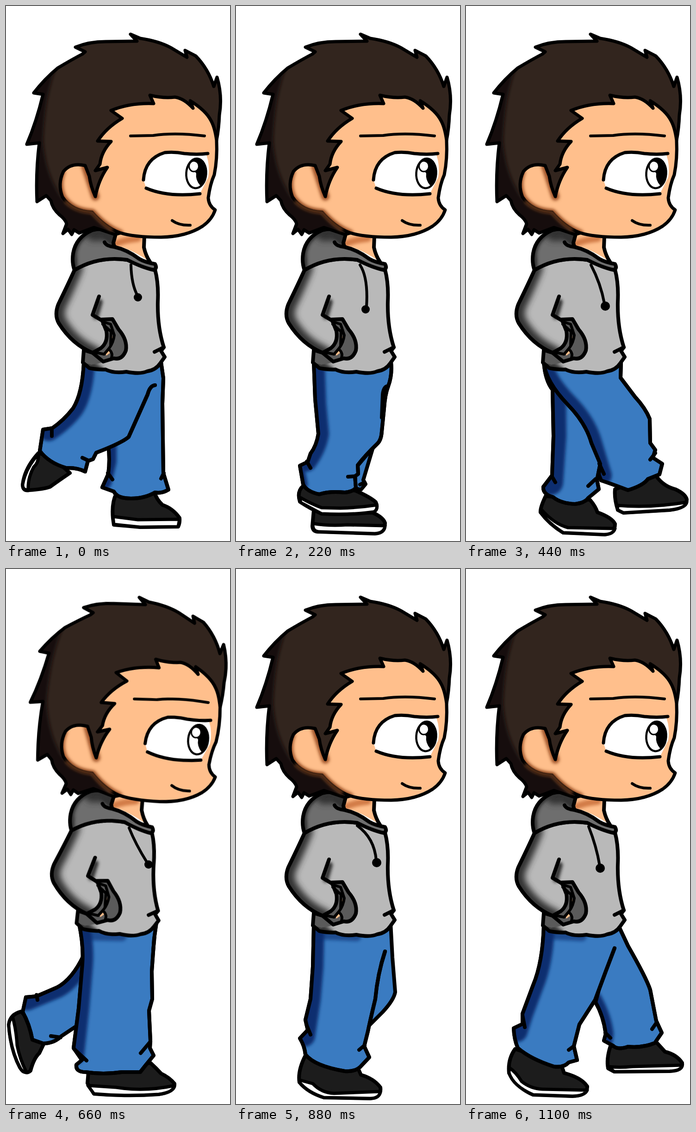
Write an HTML page without scripts that moves like this. It is 484x1157 px and loops after 1.32 s.

```html
<!DOCTYPE html>
<html lang="en">
<head>
<meta charset="utf-8">
<title>Walk cycle</title>
<style>
html, body { margin: 0; width: 100%; height: 100%; overflow: hidden; background: #fff; }
svg { display: block; width: 100%; height: 100%; }
path, use { stroke-linecap: round; stroke-linejoin: round; }
.line, .jean, .shoe, .sole, .cloth { stroke: #000; stroke-width: 8; }
.line { fill: none; }
.thin { stroke-width: 6; }
.head .line:not(.thin) { stroke-width: 7; }
.jean { fill: #3a7bc1; }
.shoe { fill: #1c1c1c; }
.sole { fill: #fff; stroke-width: 7; }
.skin { fill: #ffbf8c; }
.shade { fill: none; stroke: #0c2e70; stroke-width: 46; filter: url(#soft); }
.hem { stroke-width: 22; opacity: .6; }
.gray { stroke: #333; }
.warm { stroke: #a2562c; stroke-width: 18; }
.wide { filter: url(#softer); }

/* one pose visible at a time, 220 ms each */
.pose { visibility: hidden; animation: show 1320ms step-end infinite; animation-delay: calc(var(--i) * 220ms - 1320ms); }
@keyframes show { 0% { visibility: visible; } 16.6666% { visibility: hidden; } }

/* upper body leans forward for one step */
.head { animation: nod 1320ms step-end infinite; }
.body { animation: lean 1320ms step-end infinite; }
@keyframes nod { 0%, 66.6666% { transform: none; } 50% { transform: translate(22.3px, -12.7px) rotate(2.8deg); } }
@keyframes lean { 0%, 66.6666% { transform: none; } 50% { transform: translate(13.5px, -10.4px) rotate(2deg); } }
</style>
</head>
<body>
<svg viewBox="0 0 484 1157" preserveAspectRatio="none">
<defs>
  <filter id="soft" filterUnits="userSpaceOnUse" x="0" y="0" width="484" height="1157"><feGaussianBlur stdDeviation="3"/></filter>
  <filter id="softer" filterUnits="userSpaceOnUse" x="0" y="0" width="484" height="1157"><feGaussianBlur stdDeviation="7"/></filter>

  <path id="hair" d="M235 494L190 479L158 491L147 484L142 494L134 483L123 492L131 471Q128 461 116 452Q100 438 97 421L87 410L67 423Q64 360 72 296L45 299Q66 250 80 191L60 188Q84 157 112 134Q142 116 165 104L171 99L150 89Q180 77 215 77L283 76L269 61L290 70Q330 76 356 90L391 111L387 96L410 108Q437 136 449 174L456 154Q468 195 461 236Q460 265 455 290L400 450Z"/>
  <path id="face" d="M455 290Q451 262 443 248Q432 226 398 205L404 221Q385 200 365 197Q340 200 311 193L319 211Q268 209 227 226L251 243Q217 263 198 292L227 293Q206 315 203 342L193 356L219 349Q200 376 193 412Q183 390 180 368L171 345Q140 338 124 358Q111 385 122 413Q142 444 186 446Q214 478 245 490Q275 500 335 500Q390 499 425 476Q445 462 452 441Q438 432 437 415Q441 385 450 365Q457 330 455 290Z"/>
  <path id="torso" d="M148 571Q135 600 113 645Q104 668 114 686Q143 732 187 750L168 744L166 771L180 783Q199 787 215 786Q232 795 260 791Q290 797 305 790Q324 787 333 773L343 759L335 746L341 738Q327 695 328 640Q330 600 322 570L262 549Q200 540 148 571Z"/>
  <path id="hood" d="M186 485Q151 500 145 535Q142 555 148 571Q200 540 262 549Q295 566 320 571Q327 566 322 558Q300 554 288 547Q262 527 234 521L232 512L238 490Q212 478 186 485Z"/>

  <path id="a1" d="M335 770L340 805L338 860L340 1010L351 1046Q336 1055 322 1052Q300 1065 270 1065Q240 1065 233 1050L208 1041L221 1012Q225 980 221 950L230 900"/>
  <path id="a2" d="M322 820Q311 821 306 840L265 932Q250 945 195 966L188 980L177 984L171 1007Q155 998 130 999Q92 988 73 962L80 916L100 913Q125 896 145 870Q165 838 168 772L330 770"/>
  <path id="b1" d="M296 955L275 1025L280 1034L270 1046L257 1043L258 1000Z"/>
  <path id="b2" d="M168 770L171 850L178 925Q174 951 161 968L155 986L138 994L145 1034Q152 1050 180 1056Q200 1049 235 1052Q252 1051 259 1042L257 1017L264 1012L263 993Q280 971 305 947Q314 939 315 920L320 870Q322 840 329 822Q338 798 335 770Z"/>
  <path id="c1" d="M168 770Q171 810 187 830L189 930L186 1015L167 1040Q166 1056 188 1062Q205 1076 236 1077Q258 1074 264 1064L287 1045L283 1025L291 985L270 880"/>
  <path id="c2" d="M168 770Q172 812 220 862Q259 902 271 945L290 990L287 1013L292 1026Q316 1034 350 1047Q383 1037 393 1023L418 1013L424 990L404 977L409 960L398 945L397 893Q388 870 365 845L334 804L335 770Z"/>
  <path id="d1" d="M168 835Q143 888 110 905L66 924L43 926L36 958Q51 985 57 1018L80 1026Q104 1026 120 1010L150 990"/>
  <path id="d2" d="M158 768Q168 815 165 855L157 950L146 1036L164 1062L152 1072Q150 1088 172 1088Q210 1094 250 1088L290 1088L301 1074L319 1052L311 1036L312 1020L309 955L316 930L315 870L320 800L325 765Z"/>
  <path id="e1" d="M334 765L338 840L344 915Q341 932 317 958L285 990L290 880"/>
  <path id="e2" d="M322 827Q306 875 301 930Q289 980 285 1000L277 1032L288 1056L272 1073Q260 1088 235 1086Q170 1075 150 1050Q148 1031 138 1015L155 997L150 975L161 930L166 860L168 770L330 770"/>
  <path id="f1" d="M328 768L350 815Q390 885 398 910L411 977L423 1003L408 1025Q382 1036 350 1033Q328 1041 318 1031L298 1020L302 1005Q297 967 280 937L300 860"/>
  <path id="f2" d="M321 820L302 870L279 932L245 985L233 1032L240 1062L222 1067Q211 1079 190 1076Q140 1060 112 1036Q104 1018 103 993L122 984L122 962L145 900Q166 850 168 770L328 770"/>

  <clipPath id="hairClip"><use href="#hair"/></clipPath>
  <clipPath id="faceClip"><use href="#face"/></clipPath>
  <clipPath id="torsoClip"><use href="#torso"/></clipPath>
  <clipPath id="hoodClip"><use href="#hood"/></clipPath>
  <clipPath id="ca1"><use href="#a1"/></clipPath>
  <clipPath id="ca2"><use href="#a2"/></clipPath>
  <clipPath id="cb2"><use href="#b2"/></clipPath>
  <clipPath id="cc1"><use href="#c1"/></clipPath>
  <clipPath id="cc2"><use href="#c2"/></clipPath>
  <clipPath id="cd1"><use href="#d1"/></clipPath>
  <clipPath id="cd2"><use href="#d2"/></clipPath>
  <clipPath id="ce2"><use href="#e2"/></clipPath>
  <clipPath id="cf1"><use href="#f1"/></clipPath>
  <clipPath id="cf2"><use href="#f2"/></clipPath>
</defs>

<rect width="484" height="1157" fill="#fff"/>

<!-- legs -->
<g class="pose" style="--i:0">
  <path class="shoe" d="M70 967Q40 1000 36 1035Q36 1050 50 1047Q80 1045 95 1040Q120 1022 138 1010L100 975Z"/>
  <path class="sole" d="M70 969Q42 1000 36 1035Q36 1048 48 1046Q47 1020 60 997Q71 988 70 969Z"/>
  <path class="shoe" d="M238 1055Q228 1075 231 1108L233 1122L290 1127L372 1126Q376 1118 375 1107Q360 1086 338 1079Q325 1067 320 1050Z"/>
  <path class="sole" d="M231 1104L285 1111L375 1110L372 1126L290 1127L233 1121Z"/>
  <use href="#a1" class="jean"/>
  <g clip-path="url(#ca1)"><path class="shade" style="stroke-width:32" d="M223 940L223 985L212 1030"/></g>
  <use href="#a1" class="line"/>
  <path class="line" d="M220 1010L230 1024M341 1010L335 1022"/>
  <use href="#a2" class="jean"/>
  <g clip-path="url(#ca2)"><path class="shade" d="M169 775Q165 840 145 870Q125 896 92 918"/></g>
  <use href="#a2" class="line"/>
  <path class="line" d="M99 913L99 930M165 977L178 983"/>
</g>

<g class="pose" style="--i:1">
  <path class="shoe" d="M168 1090L165 1125Q166 1138 180 1137L300 1141Q322 1140 322 1118Q318 1106 296 1096Z"/>
  <path class="sole" d="M166 1119Q200 1125 240 1122L322 1124Q321 1140 300 1141L180 1137Q165 1137 166 1119Z"/>
  <use href="#b1" class="jean"/>
  <path class="line" d="M268 1035L278 1030"/>
  <path class="shoe" d="M145 1038Q131 1050 138 1072Q160 1087 185 1098Q250 1101 298 1094Q308 1085 302 1073Q290 1062 258 1048Z"/>
  <path class="sole" d="M137 1062Q163 1077 185 1085L225 1086Q265 1085 304 1079Q306 1090 298 1094Q250 1101 185 1098L140 1074Z"/>
  <use href="#b2" class="jean"/>
  <g clip-path="url(#cb2)"><path class="shade" d="M169 775L172 860L178 925Q173 955 152 984"/><path class="shade" style="stroke-width:18" d="M139 1000L146 1035"/></g>
  <use href="#b2" class="line"/>
  <path class="line" d="M153 985L161 999M242 1018L257 1017M329 822Q319 822 317 840L315 890"/>
</g>

<g class="pose" style="--i:2">
  <path class="shoe" d="M172 1060Q160 1085 161 1095Q180 1121 210 1139L300 1143Q322 1140 322 1120Q315 1106 284 1095Q280 1082 268 1068Z"/>
  <path class="sole" d="M162 1088Q190 1120 220 1128L322 1130Q318 1143 298 1143L210 1139Q178 1118 162 1096Z"/>
  <path class="shoe" d="M322 1045Q320 1065 328 1090L340 1096L440 1090Q478 1086 477 1067Q474 1055 452 1045Q425 1038 410 1015Z"/>
  <path class="sole" d="M327 1080Q400 1086 477 1073Q475 1086 440 1090L340 1096L328 1090Z"/>
  <use href="#c1" class="jean"/>
  <g clip-path="url(#cc1)"><path class="shade" style="stroke-width:56" d="M188 820L189 930L182 1030"/></g>
  <use href="#c1" class="line"/>
  <path class="line" d="M186 1018L193 1030M280 1023L264 1038"/>
  <use href="#c2" class="jean"/>
  <g clip-path="url(#cc2)"><path class="shade" d="M165 775Q172 812 220 862Q259 902 271 945L292 1015"/></g>
  <use href="#c2" class="line"/>
  <path class="line" d="M288 990L298 1012M409 967L398 981"/>
</g>

<g class="pose" style="--i:3">
  <path class="shoe" d="M33 957Q9 963 6 985Q10 1040 30 1078Q42 1095 53 1085Q60 1058 72 1047L82 1026L40 965Z"/>
  <path class="sole" d="M14 968Q6 977 6 988Q10 1040 30 1078Q36 1090 44 1088Q30 1060 24 1030Q22 995 14 968Z"/>
  <path class="shoe" d="M178 1088L176 1112L190 1135Q260 1141 330 1136Q366 1130 364 1113Q354 1100 335 1091Q325 1080 312 1068Z"/>
  <path class="sole" d="M177 1117L238 1121Q300 1131 364 1117Q362 1132 330 1136Q260 1141 190 1135Z"/>
  <use href="#d1" class="jean"/>
  <g clip-path="url(#cd1)"><path class="shade" d="M168 835Q143 888 110 905L45 932"/></g>
  <use href="#d1" class="line"/>
  <path class="line" d="M66 921L68 932M97 1010L118 1013"/>
  <use href="#d2" class="jean"/>
  <g clip-path="url(#cd2)"><path class="shade" d="M158 770Q168 815 165 855L157 950L146 1050"/><path class="shade hem" d="M165 792L250 794"/></g>
  <use href="#d2" class="line"/>
  <path class="line" d="M147 1038L174 1063M312 1022L291 1047M321 796L318 825"/>
</g>

<g class="pose" style="--i:4">
  <path class="shoe" d="M150 1052Q133 1085 137 1110Q155 1132 190 1143L290 1145Q315 1142 312 1121Q298 1102 270 1094L262 1076Z"/>
  <path class="sole" d="M137 1105L166 1113Q185 1133 212 1134L312 1130Q310 1145 290 1145L190 1143Q155 1132 137 1110Z"/>
  <use href="#e1" class="jean"/>
  <use href="#e2" class="jean"/>
  <g clip-path="url(#ce2)"><path class="shade" d="M168 775L166 860L160 930L148 1010"/><path class="shade hem" d="M175 790L260 794"/></g>
  <use href="#e2" class="line"/>
  <path class="line" d="M152 985L161 1007M278 1030L266 1040M322 827L314 854"/>
</g>

<g class="pose" style="--i:5">
  <path class="shoe" d="M312 1032Q303 1060 307 1080L320 1087L440 1086Q470 1085 467 1068Q455 1050 430 1044L410 1022Z"/>
  <path class="sole" d="M307 1076Q330 1079 360 1076L467 1073Q466 1085 440 1086L320 1087Z"/>
  <path class="shoe" d="M106 1038Q90 1060 93 1090Q110 1122 145 1137L230 1140Q263 1138 262 1119Q250 1100 212 1090L205 1070Z"/>
  <path class="sole" d="M93 1078Q108 1088 120 1108Q140 1124 165 1125L262 1127Q256 1140 230 1140L145 1137Q102 1118 93 1090Z"/>
  <use href="#f1" class="jean"/>
  <g clip-path="url(#cf1)"><path class="shade" style="stroke-width:34" d="M276 930Q297 967 302 1005L300 1020"/></g>
  <use href="#f1" class="line"/>
  <path class="line" d="M301 1003L312 1014M411 982L402 995"/>
  <use href="#f2" class="jean"/>
  <g clip-path="url(#cf2)"><path class="shade" d="M168 775Q166 850 145 900L122 962L110 1000"/><path class="shade hem" d="M175 790L250 794"/></g>
  <use href="#f2" class="line"/>
  <path class="line" d="M122 965L127 991M233 1032L222 1040"/>
</g>

<!-- hoodie and neck -->
<g class="body">
  <path class="skin" d="M238 490L232 516Q270 525 311 553Q297 535 299 495Z"/>
  <path class="shade warm" style="stroke:#d27b46;stroke-width:14" d="M238 514Q255 506 285 503"/>
  <path class="line" d="M299 498L298 522Q302 540 311 553"/>
  <use href="#torso" fill="#b9b9b9"/>
  <g clip-path="url(#torsoClip)">
    <path class="shade gray wide" style="stroke-width:42" d="M145 566Q132 600 110 645Q101 668 112 688Q140 735 187 755"/>
    <path class="shade gray" style="stroke-width:12" d="M203 640L194 672M166 768L205 786"/>
    <path fill="#5a5a5a" d="M168 748L190 752L212 770L184 776L166 770Z"/>
  </g>
  <use href="#torso" class="line"/>
  <path class="line" d="M341 738L321 748M201 628L187 668L207 680"/>
  <path class="cloth" fill="#5a5a5a" d="M207 678L230 677L243 699Q263 722 259 745Q251 766 233 762L210 769L187 750L205 740Q221 727 217 703Z"/>
  <path class="skin" d="M226 704L231 717L225 728ZM213 748L223 740L225 750L217 756Z"/>
  <path class="line thin" d="M213 684L226 688L234 712Q232 728 223 740L212 753L192 749M209 688L227 704L226 735M225 745Q231 752 228 760"/>
  <use href="#hood" fill="#6e6e6e"/>
  <g clip-path="url(#hoodClip)">
    <path class="shade gray wide" style="stroke-width:34" d="M235 496Q212 488 190 492"/>
    <path class="shade gray" style="stroke-width:16" d="M218 496L232 512M186 485Q151 500 145 535L147 571"/>
  </g>
  <use href="#hood" class="line"/>
  <path class="line" d="M213 511Q217 520 236 521"/>
</g>

<!-- drawstring -->
<g class="pose" style="--i:0"><path class="line thin" d="M270 560Q271 602 284 626"/><circle cx="285" cy="630" r="9"/></g>
<g class="pose" style="--i:1"><path class="line thin" d="M268 560Q286 588 282 650"/><circle cx="280" cy="656" r="9"/></g>
<g class="pose" style="--i:2"><path class="line thin" d="M270 560Q291 600 299 643"/><circle cx="301" cy="649" r="10"/></g>
<g class="pose" style="--i:3"><path class="line thin" d="M266 560Q280 595 305 635"/><circle cx="308" cy="639" r="9"/></g>
<g class="pose" style="--i:4"><path class="line thin" d="M262 555Q299 582 303 630"/><circle cx="304" cy="635" r="10"/></g>
<g class="pose" style="--i:5"><path class="line thin" d="M265 557Q282 600 289 642"/><circle cx="290" cy="647" r="10"/></g>

<!-- head -->
<g class="head">
  <use href="#hair" fill="#32251e"/>
  <g clip-path="url(#hairClip)">
    <path fill="#150e0b" filter="url(#soft)" d="M110 128Q84 190 80 290Q84 350 108 395Q130 440 185 447L240 500L110 510L30 430L30 180Z"/>
  </g>
  <use href="#hair" class="line"/>
  <use href="#face" class="skin"/>
  <g clip-path="url(#faceClip)">
    <path class="shade warm" d="M171 345L180 372L193 412M119 360Q109 390 122 415Q142 446 186 448Q214 480 245 492"/>
  </g>
  <use href="#face" class="line"/>
  <path class="shade" style="stroke:#7a4324;stroke-width:6" d="M130 424Q150 444 186 446Q208 472 228 483"/>
  <path fill="#fff" d="M297 376Q304 334 340 319Q380 316 433 322Q441 345 437 370L419 406Q350 413 303 394Z"/>
  <g transform="rotate(4 411 362)">
    <ellipse cx="411" cy="362" rx="21.5" ry="32" fill="#fff" stroke="#000" stroke-width="4.5"/>
    <path d="M400 337Q410 328 419 332Q434 343 433 366Q431 386 421 387Q410 376 411 362Q400 352 400 337Z"/>
    <ellipse cx="405" cy="347" rx="10.5" ry="11.5" fill="#fff" stroke="#000" stroke-width="3"/>
  </g>
  <path class="line" d="M297 376Q300 330 343 317Q365 315 385 319Q413 322 436 319M303 394Q350 414 419 406"/>
  <path class="line thin" d="M269 281L318 280Q365 273 429 281M359 464Q374 475 398 474"/>
</g>
</svg>
</body>
</html>
```
